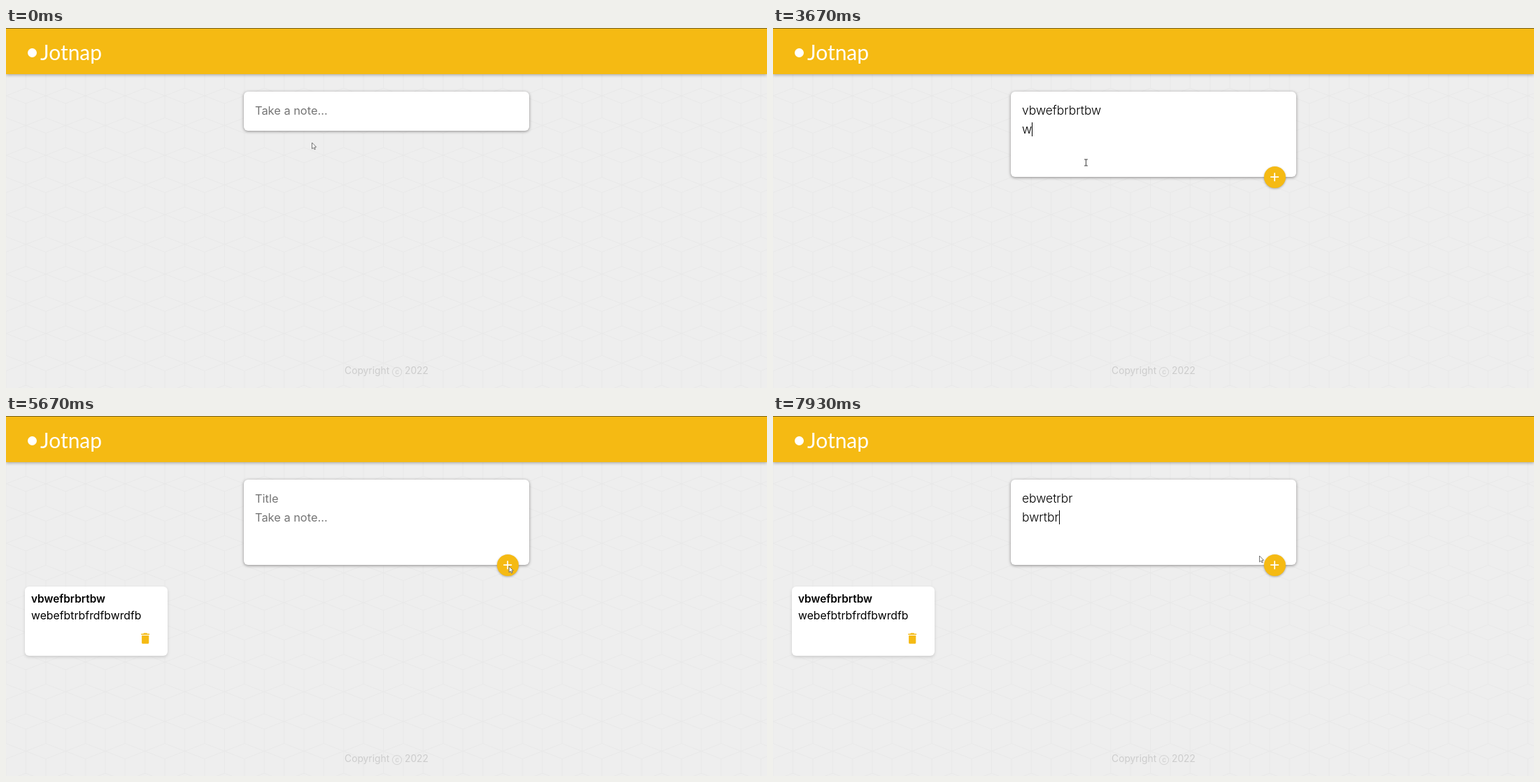
Recreate the animation shown at these times as an HTML page. Size 1088 by 515 pixels, loop 8 s.

```html
<!DOCTYPE html>
<html lang="en">
<head>
<meta charset="utf-8">
<title>Notes</title>
<style>
  html, body { margin: 0; width: 100%; height: 100%; overflow: hidden; background: #eee; }
  body { font-family: Inter, sans-serif; }
  #stage { position: absolute; left: 0; top: 0; width: 1088px; height: 515px; overflow: hidden; }
  #stage > * { position: absolute; }
  #form > *, #card > * { position: absolute; }
  header {
    left: 0; top: 0; width: 1088px; height: 65.5px; box-sizing: border-box;
    background: #f5ba13; border-top: 1px solid #75601f;
    box-shadow: 0 1.7px 4.3px rgba(0, 0, 0, .3);
  }
  header i { position: absolute; left: 31px; top: 28px; width: 13px; height: 13px; border-radius: 50%; background: #fff; }
  header b { position: absolute; left: 49px; top: 13px; font: 400 30px/40px Lato, sans-serif; color: #fff; }
  footer { left: 0; top: 480px; width: 1088px; text-align: center; font-size: 13.8px; line-height: 20px; color: #ccc; }
  #form { left: 340px; top: 91px; width: 408px; background: #fff; border-radius: 6px; box-shadow: 0 1px 4px #8a8989; }
  .field { left: 16px; font-size: 17.4px; font-weight: 300; line-height: 20px; white-space: pre; color: #000; }
  .field u { text-decoration: none; font-size: 16.4px; font-weight: 400; color: #757575; }
  .field i { position: absolute; width: 1px; height: 20px; background: #000; }
  #title { top: 17px; }
  #content { top: 43.5px; }
  #add { left: 362px; top: 107px; width: 31px; height: 31px; border-radius: 50%; background: #f5ba13; box-shadow: 0 1px 3px rgba(0, 0, 0, .3); }
  #add svg { position: absolute; left: 5.3px; top: 5.3px; }
  #card { left: 27px; top: 244px; width: 204px; height: 98.5px; background: #fff; border-radius: 6px; box-shadow: 0 2px 4px #ccc; }
  #card span { left: 9px; line-height: 20px; font-size: 15.8px; }
  #card svg { left: 161.8px; top: 63.5px; }
</style>
</head>
<body>
<div id="stage">
  <svg width="1088" height="515">
    <pattern id="cubes" x="0" y="97" width="56.8" height="85" patternUnits="userSpaceOnUse">
      <path fill="none" stroke="#e8e8e8" d="M0 0L28.4 -11L56.8 0L28.4 11ZM0 85L28.4 74L56.8 85M28.4 42.5L0 31.5L-28.4 42.5L0 53.5ZM28.4 42.5L56.8 31.5L85.2 42.5L56.8 53.5ZM0 0V31.5M56.8 0V31.5M28.4 11V74M0 53.5V85M56.8 53.5V85"/>
    </pattern>
    <rect width="1088" height="515" fill="url(#cubes)"/>
  </svg>
  <header><i></i><b>Jotnap</b></header>
  <footer>Copyright ⓒ 2022</footer>
  <div id="form">
    <div id="title" class="field"><span></span><i></i><u>Title</u></div>
    <div id="content" class="field"><span></span><i></i><u>Take a note...</u></div>
    <div id="add"><svg width="20.4" height="20.4" viewBox="0 0 24 24"><path fill="#fff" d="M19 13h-6v6h-2v-6H5v-2h6V5h2v6h6v2z"/></svg></div>
  </div>
  <div id="card">
    <span style="top:8px;font-weight:600;font-size:15.4px">vbwefbrbrtbw</span>
    <span style="top:32px">webefbtrbfrdfbwrdfb</span>
    <svg width="20.4" height="20.4" viewBox="0 0 24 24"><path fill="#f5ba13" d="M6 19c0 1.1.9 2 2 2h8c1.1 0 2-.9 2-2V7H6v12zM19 4h-3.5l-1-1h-5l-1 1H5v2h14V4z"/></svg>
  </div>
  <svg width="1088" height="515">
    <path id="arrow" fill="#fff" stroke="#666" stroke-width=".9" d="M.5 0V8.8L2.6 7L4 9.9L5.4 9.3L4.1 6.5L6.6 6.3Z"/>
    <path id="beam" fill="none" stroke="#444" d="M-2.5 -4.5H2.5M0 -4.5V4.5M-2.5 4.5H2.5"/>
  </svg>
</div>
<script>
const LOOP = 8000, STEP = 1000 / 15, BLINK = 530;
const OPEN = 600, ZOOM = 670, SAVE = 5530;
const el = id => document.getElementById(id);
const show = (node, on) => { node.style.display = on ? '' : 'none'; };

const burst = (field, text, start, end = start) => ({ field, text, start, end });
const bursts = [
  burst('title', 'v', 1600),
  burst('title', 'bwefb', 1870, 2070),
  burst('title', 'rb', 2330),
  burst('title', 'rtbw', 2470, 2730),
  burst('content', 'webe', 3670, 3930),
  burst('content', 'fbt', 4070, 4200),
  burst('content', 'rbfrdfbwrdfb', 4400, 5130),
  burst('title', 'eb', 6800, 6930),
  burst('title', 'wetrbr', 7070, 7330),
  burst('content', 'bwrtbr', 7600, 7930)
];

const focus = (start, field) => ({ start, field });
const focuses = [
  focus(OPEN, 'content'), focus(1200, 'title'), focus(3200, 'content'),
  focus(5470, 'button'), focus(6600, 'title'), focus(7470, 'content')
];

const glide = (start, end, x, y) => ({ start, end, x, y });
const glides = [
  glide(70, 330, 436.5, 113),
  glide(2730, 3130, 442, 160),
  glide(3400, 3600, 447.5, 192.5),
  glide(4600, 5000, 660, 253),
  glide(5000, 5200, 735, 228),
  glide(5200, 5330, 719, 215),
  glide(5670, 6130, 496, 145.5),
  glide(6130, 6330, 450, 117.5),
  glide(7400, 7930, 695, 200)
];

const progress = ({ start, end }, t) =>
  t < start ? 0 : t >= end ? 1 : (t - start) / (end - start);

function pointerAt(t) {
  let x = 437, y = 164;
  for (const g of glides) {
    const k = progress(g, t);
    x += (g.x - x) * k;
    y += (g.y - y) * k;
  }
  return [x, y];
}

// Letters of a burst come at even intervals, the first one at its start.
function typed(field, t) {
  return bursts
    .filter(b => b.field === field && b.start <= t && (b.start > SAVE) === (t >= SAVE))
    .map(b => b.text.slice(0, 1 + Math.floor((b.text.length - 1) * progress(b, t))))
    .join('');
}

// The blink restarts at each focus change or key press.
function caretField(t) {
  const active = focuses.filter(f => f.start <= t).pop();
  if (!active) return '';
  const last = Math.max(active.start, ...bursts.filter(b => b.start <= t).map(b => Math.min(b.end, t)));
  return Math.floor((t - last) / BLINK) % 2 ? '' : active.field;
}

function drawField(id, t) {
  const [span, caret, hint] = el(id).children;
  const text = typed(id, t);
  span.textContent = text;
  show(hint, !text);
  show(caret, caretField(t) === id);
}

// cubic-bezier(.4, 0, .2, 1)
function ease(x) {
  let lo = 0, hi = 1, u;
  for (let i = 0; i < 20; i++) {
    u = (lo + hi) / 2;
    const bx = 1.2 * u * (1 - u) ** 2 + .6 * u * u * (1 - u) + u ** 3;
    if (bx < x) lo = u; else hi = u;
  }
  return 3 * u * u * (1 - u) + u ** 3;
}

function draw(now) {
  const t = Math.floor((now % LOOP + 4) / STEP) * STEP + 4;
  const open = t >= OPEN;

  el('form').style.height = (open ? 122 : 56) + 'px';
  show(el('title'), open);
  el('content').style.top = open ? '' : '17px';
  drawField('title', t);
  drawField('content', t);
  el('add').style.transform = `scale(${ease(progress({ start: ZOOM, end: ZOOM + 225 }, t))})`;
  show(el('add'), t > ZOOM);
  show(el('card'), t >= SAVE);

  const [x, y] = pointerAt(t);
  const overText = x > 350 && x < 690 && y > 105 && y < (open ? 197 : 131);
  for (const id of ['arrow', 'beam']) el(id).setAttribute('transform', `translate(${x} ${y})`);
  show(el('beam'), overText);
  show(el('arrow'), !overText);
}

const start = performance.now();
function tick() {
  draw(performance.now() - start);
  requestAnimationFrame(tick);
}
tick();
</script>
</body>
</html>
```
